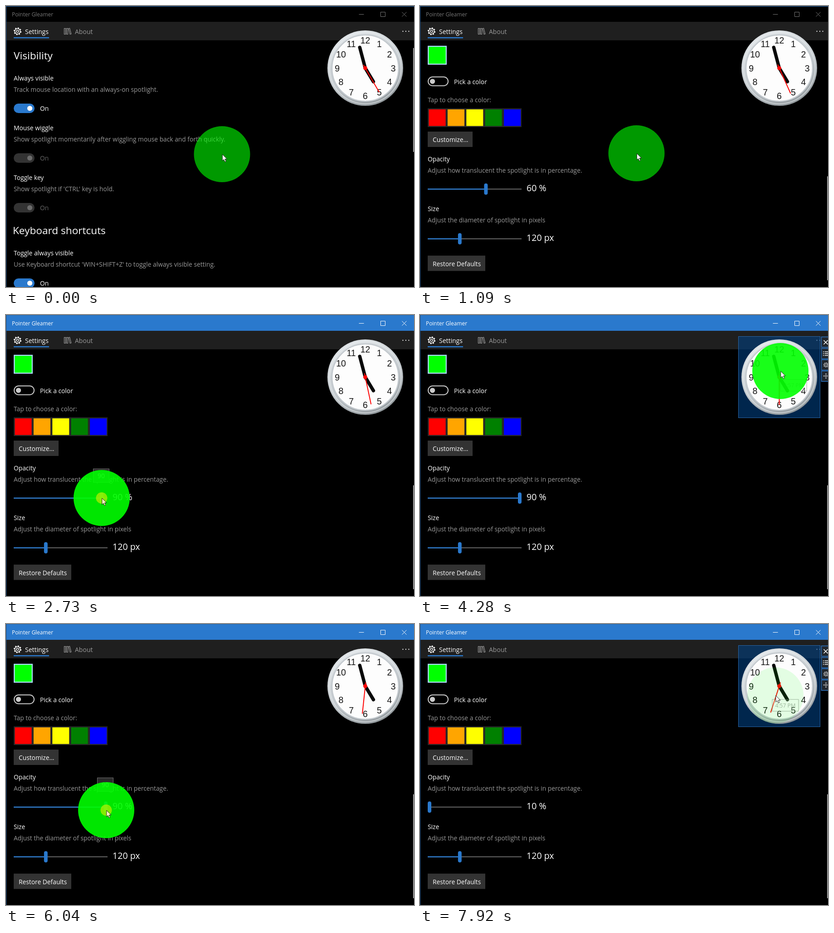
Write an HTML page that moves like this. It is 900x622 px and loops after 8 s.

```html
<!DOCTYPE html>
<html lang="en">
<head>
<meta charset="utf-8">
<title>Pointer Gleamer</title>
<style>
  html, body { margin: 0; width: 100%; height: 100%; overflow: hidden; background: #000; }
  svg { display: block; width: 100vw; height: 100vh; }
  text { font: 13.8px "Open Sans", "Noto Sans", sans-serif; fill: #fff; }
  .title { font-size: 11.9px; }
  .tab { font-size: 14px; }
  .head { font-size: 22.6px; }
  .value { font-size: 19.6px; }
  .dim { fill: #999; }
  .off { fill: #666; }
  .num { font: 19.5px "Liberation Sans", Arial, sans-serif; fill: #151515; text-anchor: middle; }
  .accent { fill: #2a79cd; }
  .line { fill: none; stroke: #fff; }
</style>
</head>
<body>
<svg id="stage" viewBox="0 0 900 622" preserveAspectRatio="none"></svg>
<script>
const LOOP = 8000;
const SCROLL = 675;
const GREEN = '#00ff00';

// Markup helpers
const rect = (x, y, w, h, attrs = '') =>
  `<rect x="${x}" y="${y}" width="${w}" height="${h}" ${attrs}/>`;
const circle = (x, y, r, attrs = '') => `<circle cx="${x}" cy="${y}" r="${r}" ${attrs}/>`;
const path = (d, attrs = '') => `<path d="${d}" ${attrs}/>`;
const label = (x, y, str, cls = '', attrs = '') =>
  `<text x="${x}" y="${y}" class="${cls}" ${attrs}>${str}</text>`;

const toggle = (y, enabled) =>
  rect(17, y - 10.5, 46, 21, `rx="10.5" fill="${enabled ? '#2a79cd' : '#333'}"`) +
  circle(52.5, y, 5.6, `fill="${enabled ? '#fff' : '#6c6c6c'}"`) +
  label(75, y + 5.5, 'On', enabled ? '' : 'off');

const setting = (y, name, text, enabled) =>
  label(17, y, name) + label(17, y + 25, text, 'dim') + toggle(y + 61.5, enabled);

const button = (y, w, text) => rect(17, y, w, 34, 'fill="#333"') + label(28, y + 23, text);

const slider = (y, id, x, text) =>
  rect(17, y - 1, 207, 2, 'fill="#686868"') +
  rect(17, y - 1.2, x - 17, 2.4, `class="accent" id="${id}Fill"`) +
  rect(-4, y - 12.5, 8, 25, `rx="4" class="accent" id="${id}Thumb" transform="translate(${x})"`) +
  label(235, y + 5, text, 'value', `id="${id}Text"`);

const gear = (x, y, r, color) => `<g fill="none" stroke="${color}">` +
  circle(x, y, r, `stroke-width="${r * .3}" stroke-dasharray="${r * Math.PI / 8}"`) +
  circle(x, y, r * .8, `stroke-width="${r * .18}"`) +
  circle(x, y, r * .34, `stroke-width="${r * .18}"`) + '</g>';

const swatches = ['#ff0000', '#ffa500', '#ffff00', '#008000', '#0000ff']
  .map((color, i) => rect(19.5 + i * 41.4, 228.8, 37, 36.8, `fill="${color}"`)).join('');

const page =
  label(17, 118, 'Visibility', 'head') +
  setting(165, 'Always visible', 'Track mouse location with an always-on spotlight.', true) +
  setting(275, 'Mouse wiggle', 'Show spotlight momentarily after wiggling mouse back and forth quickly.', false) +
  setting(385, 'Toggle key', "Show spotlight if 'CTRL' key is hold.", false) +
  label(15, 505, 'Keyboard shortcuts', 'head') +
  setting(552, 'Toggle always visible', "Use Keyboard shortcut 'WIN+SHIFT+Z' to toggle always visible setting.", true) +
  label(17, 672, 'Appearance', 'head') +
  label(17, 719, 'Color') +
  `<g transform="translate(0 ${SCROLL})">` +
    rect(18.2, 89.2, 39.6, 39.6, `fill="${GREEN}" stroke="#a9d6f5" stroke-width="2.4"`) +
    rect(18, 157, 44, 19.5, 'rx="9.75" fill="none" stroke="#ccc" stroke-width="2"') +
    circle(27.5, 166.8, 5.6, 'fill="#ccc"') +
    label(75, 173, 'Pick a color') +
    label(17, 213, 'Tap to choose a color:', 'dim') +
    rect(17, 226.5, 207, 41.5, 'fill="#272727"') + swatches +
    button(278, 99, 'Customize...') +
    label(17, 344, 'Opacity') +
    label(17, 369, 'Adjust how translucent the spotlight is in percentage.', 'dim') +
    slider(405.3, 'opacity', 145.4, '60 %') +
    label(17, 454, 'Size') +
    label(17, 479, 'Adjust the diameter of spotlight in pixels', 'dim') +
    slider(515.3, 'size', 87.8, '120 px') +
    button(552.5, 127, 'Restore Defaults') +
    '<g id="tip">' +
      rect(-17.5, 340.5, 35, 30, 'fill="#2b2b2b" stroke="#727272"') +
      label(0, 361, '', '', 'id="tipText" text-anchor="middle"') +
    '</g>' +
  '</g>';

const chrome =
  rect(0, 0, 900, 35, 'id="titleBar"') +
  label(13, 23, 'Pointer Gleamer', 'title', 'id="title"') +
  path('M778.5 18.5H789.5M826.5 13.5h10v10h-10zM873.5 13.5l10 10m0-10l-10 10', 'id="controls" fill="none"') +
  rect(0, 35, 900, 41, 'fill="#1f1f1f"') +
  gear(25.5, 56, 7.4, '#fff') +
  label(42, 62, 'Settings', 'tab') +
  rect(17, 69, 78, 2.5, 'class="accent"') +
  path('M128.5 49.5h3v13h-3zM133.5 49.5h3v13h-3zM138 50l2.5-.8 3.3 12.6-2.6.8z', 'fill="none" stroke="#999" stroke-width="1.2"') +
  label(152, 62, 'About', 'tab dim') +
  [875.5, 882, 888.5].map(x => circle(x, 56, 1.2, 'fill="#ddd"')).join('') +
  rect(898, 0, 2, 230, 'fill="#9a9a9a" id="scrollBar"') +
  rect(0, 0, 900, 1.2, 'fill="#2c68a8"') +
  rect(0, 0, 1.1, 622, 'fill="#1c4a7c"');

const sideButtons = [48, 73.5, 98.5, 123.5].map(y =>
  rect(885.5, y + .5, 20, 23, 'fill="#22272d" stroke="#2a70bd" stroke-width="1.6"')).join('');

const panel = '<g id="panel">' +
  rect(702.5, 47.5, 180, 180, 'fill="#004080" fill-opacity=".6" stroke="#2a66a6"') +
  sideButtons +
  path('M890.5 56l9 9m0-9l-9 9', 'class="line" stroke-width="1.5"') +
  path('M889 81.5h2m1.5 0h8M889 85.5h2m1.5 0h8M889 89.5h2m1.5 0h8', 'class="line" stroke-width="1.5"') +
  gear(895.5, 110.5, 4.8, '#ddd') +
  circle(895.5, 135, 2, 'class="line"') +
  path('M893.5 131l2-2 2 2zM893.5 139l2 2 2-2zM891.5 133l-2 2 2 2zM899.5 133l2 2-2 2z', 'fill="#ddd"') +
  '</g>';

const numerals = Array.from({ length: 12 }, (_, i) => {
  const a = (i + 1) * Math.PI / 6;
  return label(792.5 + 61.8 * Math.sin(a), 144.7 - 61.5 * Math.cos(a), i + 1, 'num');
}).join('');

const clock =
  circle(792.5, 137.5, 83.5, 'fill="url(#rim)"') +
  circle(792.5, 137.5, 79, 'fill="none" stroke="#eef1f3" stroke-opacity=".45" stroke-width="3"') +
  circle(792.5, 137.5, 73.5, 'fill="#fdfdfd" stroke="#c3c9ce" stroke-width="2.5"') +
  numerals +
  path('M792.5 137.5L810.5 167.5M792.5 137.5L780.3 91.5', 'fill="none" stroke="#080808" stroke-width="7.4" stroke-linecap="round"') +
  '<g id="second" fill="#f00">' + rect(791.5, 76, 2, 70) + circle(792.5, 137.5, 4.4) + '</g>';

const stage = document.getElementById('stage');
stage.innerHTML =
  `<defs>
    <clipPath id="view">${rect(0, 76, 900, 546)}</clipPath>
    <linearGradient id="rim" x1=".25" y1="0" x2=".7" y2="1">
      <stop offset="0" stop-color="#e2e6e9"/><stop offset=".55" stop-color="#c3c9cd"/>
      <stop offset="1" stop-color="#8b9296"/>
    </linearGradient>
  </defs>` +
  rect(0, 0, 900, 622) +
  `<g clip-path="url(#view)"><g id="page">${page}</g></g>` +
  chrome + panel + clock +
  '<g id="timeTip" opacity=".6">' +
    rect(.5, .5, 58, 26, 'fill="#fff" fill-opacity=".35" stroke="#777"') +
    label(29.5, 18, '4:57 PM', '', 'text-anchor="middle" style="fill:#777;font-size:12px"') +
  '</g>' +
  '<g id="pointer">' +
    circle(0, 0, 62, `fill="${GREEN}" id="spot"`) +
    circle(0, 0, 12.5, 'fill="#ffee00" fill-opacity=".52" id="press"') +
    path('M.8.5V14.8L4 11.7 6.3 17 8.8 15.9 6.5 10.8H11z', 'stroke="#111" stroke-width=".9" id="arrow"') +
  '</g>';

const el = {};
stage.querySelectorAll('[id]').forEach(node => el[node.id] = node);

const ticks = [[0, 0, 1], [100, 310, 3], [450, 1090, 7], [1300, 2090, 8], [2200, 2950, 8],
  [3070, 3070, 1], [3310, 4080, 8], [4280, 5050, 8], [5180, 5940, 8], [6040, 6720, 7],
  [7030, 7810, 8], [7920, 7920, 1]]
  .flatMap(([from, to, n]) => Array.from({ length: n }, (_, i) => from + (to - from) * i / (n - 1 || 1)));

const route = [
  [0, 476.5, 328], [310, 477.5, 326], [1190, 477.5, 326], [1900, 146, 414], [2090, 145, 417],
  [2200, 145, 415], [2736, 211, 405], [2950, 225, 405], [3070, 233, 405], [3200, 233, 405],
  [3970, 792, 128], [4080, 795, 124], [4280, 795, 124], [5050, 226, 419], [5180, 220, 416],
  [5500, 195, 413], [5940, 221, 412], [6040, 221, 412], [6600, 20, 420], [6720, 12, 421],
  [6920, 12, 421], [7141, 120, 408], [7253, 230, 373], [7700, 765, 141], [7810, 777, 149], [7920, 784, 158]
];

const clamp = (v, lo, hi) => Math.min(hi, Math.max(lo, v));
const smooth = (t, from, to) => {
  const u = clamp((t - from) / (to - from), 0, 1);
  return u * u * (3 - 2 * u);
};
const within = (t, from, to) => t >= from && t < to;
const show = (node, on) => node.setAttribute('visibility', on ? 'visible' : 'hidden');
const move = (node, x, y = 0) => node.setAttribute('transform', `translate(${x} ${y})`);

function pointerAt(t) {
  const i = route.findIndex(key => key[0] >= t);
  if (i <= 0) return route[i < 0 ? route.length - 1 : 0].slice(1);
  const [t0, x0, y0] = route[i - 1];
  const [t1, x1, y1] = route[i];
  const k = smooth(t, t0, t1);
  return [x0 + (x1 - x0) * k, y0 + (y1 - y0) * k];
}

const thumbAt = value => 21 + (value - 10) * 2.4875;

function draw(t) {
  const [x, y] = pointerAt(t);
  const pressed = within(t, 2200, 3060) || within(t, 5930, 7020);
  const active = t >= 2190;
  const thumb = pressed ? clamp(x, 21, 220) : thumbAt(t < 2200 ? 60 : t < 5930 ? 90 : 10);
  const value = Math.round((10 + (thumb - 21) / 2.4875) / 10) * 10;

  const scroll = SCROLL * smooth(t, 343, 1090);
  move(el.page, 0, -scroll);
  move(el.scrollBar, 0, 93 + scroll * .4207);

  el.titleBar.setAttribute('fill', active ? '#2a79cd' : '#000');
  el.title.style.fill = active ? '#fff' : '#777';
  el.controls.setAttribute('stroke', active ? '#fff' : '#777');

  el.opacityFill.setAttribute('width', thumb - 17);
  move(el.opacityThumb, thumb);
  el.opacityText.textContent = value + ' %';
  show(el.tip, within(t, 2200, 3300) || within(t, 5930, 7400));
  move(el.tip, Math.round(thumb) - 1);
  el.tip.setAttribute('opacity', t > 7200 ? .75 : 1);
  el.tipText.textContent = value;

  const seconds = 26 + Math.floor((t - 270) / 1000);
  el.second.setAttribute('transform', `rotate(${seconds * 6} 792.5 137.5)`);
  show(el.panel, x > 702 && within(y, 47, 228));
  show(el.timeTip, within(t, 4270, 4380) || t >= 7910);
  move(el.timeTip, ...(t < 5000 ? [794.5, 142] : [776.5, 166.5]));

  move(el.pointer, x, y);
  el.spot.setAttribute('fill-opacity', value / 100);
  show(el.press, pressed);
  el.arrow.setAttribute('fill', pressed ? '#fff6c0' : '#fff');
}

function frame() {
  const now = performance.now() % LOOP + 12;
  draw(ticks.findLast(tick => tick <= now));
  requestAnimationFrame(frame);
}
frame();
</script>
</body>
</html>
```
